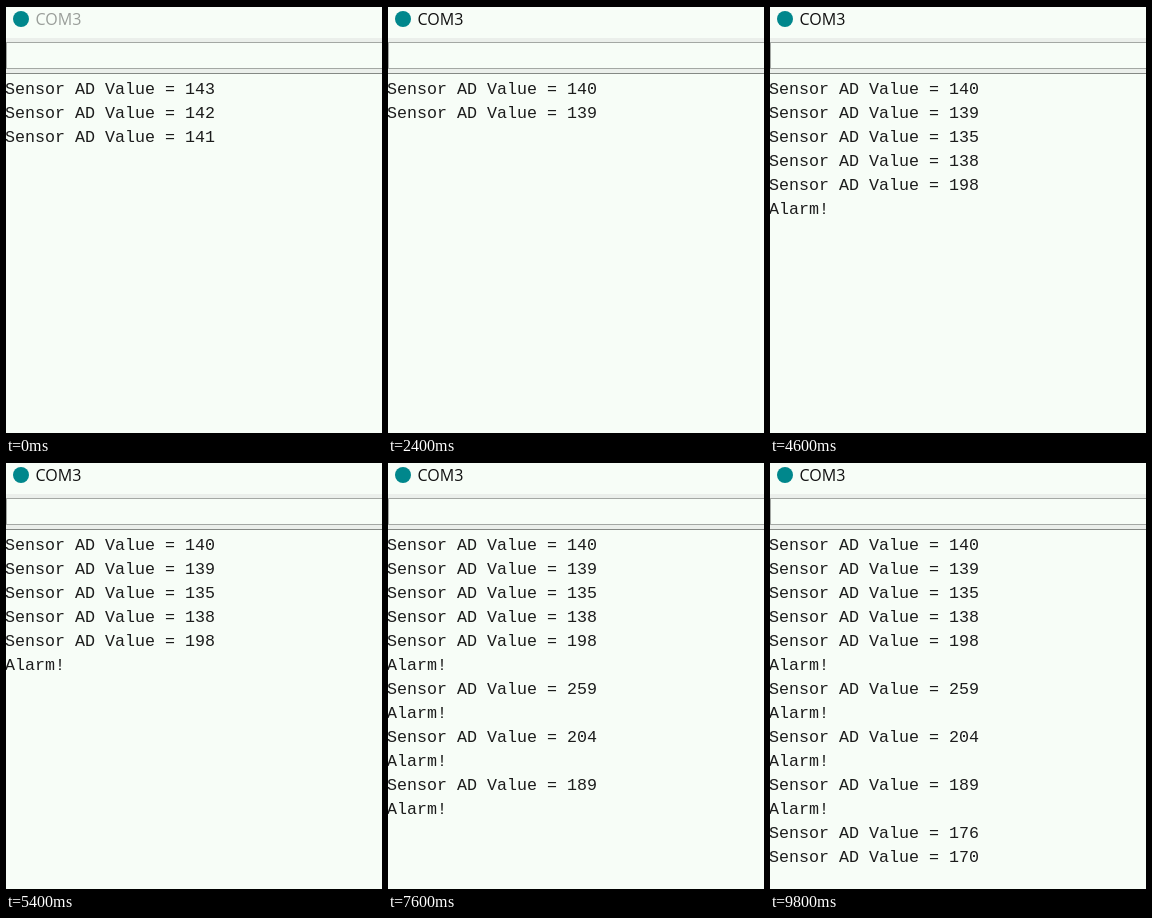
Animation of 376 by 428 pixels, one loop 10000 ms. Source, as an HTML page:

```html
<!DOCTYPE html>
<html lang="en">
<head>
<meta charset="utf-8">
<title>Serial monitor</title>
<style>
  html, body { margin: 0; width: 100%; height: 100%; overflow: hidden; background: #f7fdf7; }
  svg { display: block; }
  #title { font: 16px "Open Sans", "Noto Sans", sans-serif; }
  #log { font: 16.66px "Liberation Mono", "Courier New", monospace; fill: #1c1c1c; }
</style>
</head>
<body>
<svg width="376" height="428" viewBox="0 0 376 428">
  <rect width="376" height="428" fill="#f7fdf7"/>
  <rect y="32" width="376" height="36" fill="#ebefeb"/>
  <rect x=".5" y="36.5" width="380" height="26" fill="#f7fdf7" stroke="#a4a8a4"/>
  <path d="M0 67.5H376" stroke="#858985"/>
  <path d="M0 .5H376M0 427.5H376" stroke="#000"/>
  <circle cx="15" cy="13" r="8" fill="#00878c"/>
  <text id="title" x="29.5" y="19">COM3</text>
  <g id="log"></g>
</svg>
<script>
const LOOP = 10000, RESET = 400, FIRST = 600, PERIOD = 1000, ALARM = 180;
const stale = [143, 142, 141];
const readings = [140, 139, 135, 138, 198, 259, 204, 189, 176, 170];
const title = document.getElementById('title');
const log = document.getElementById('log');

const report = values => values.flatMap(v =>
  [`Sensor AD Value = ${v}`, ...(v > ALARM ? ['Alarm!'] : [])]);

function linesAt(t) {
  if (t < RESET) return report(stale);
  const count = Math.max(0, Math.floor((t - FIRST) / PERIOD) + 1);
  return report(readings.slice(0, count));
}

let shown = '';
function draw() {
  const t = performance.now() % LOOP;
  title.setAttribute('fill', t < RESET ? '#9a9e9a' : '#111');
  const markup = linesAt(t)
    .map((line, i) => `<text x="-1" y="${88 + 24 * i}">${line}</text>`).join('');
  if (markup !== shown) log.innerHTML = shown = markup;
  requestAnimationFrame(draw);
}
draw();
</script>
</body>
</html>
```
